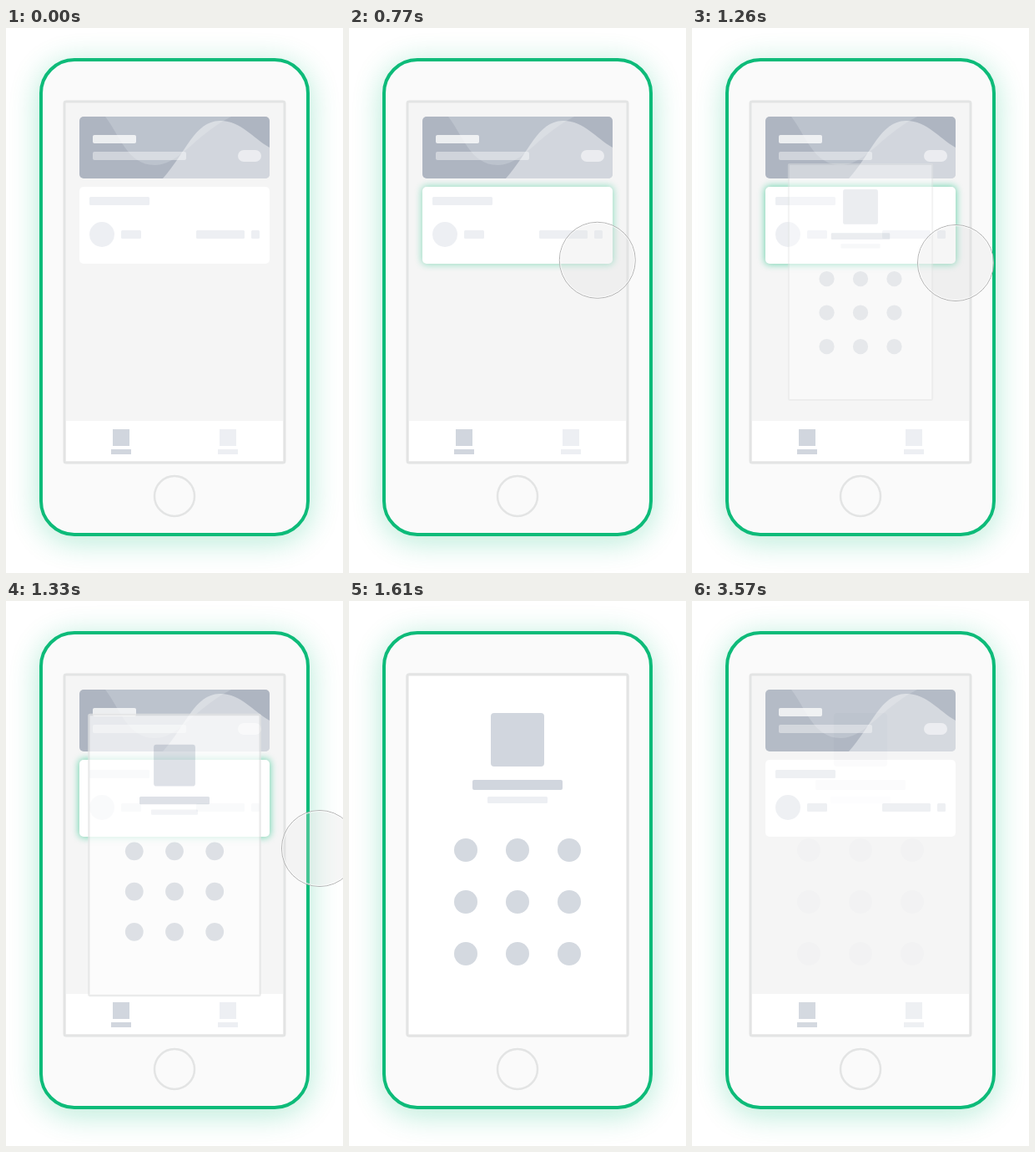
Recreate the animation shown at these times as an HTML page. Size 404 by 652 pixels, loop 4.06 s.

```html
<!DOCTYPE html>
<html lang="en">
<head>
<meta charset="utf-8">
<title>Phone lock screen</title>
<style>
html, body { margin: 0; width: 100%; height: 100%; overflow: hidden; background: #fff; }
svg { display: block; }
.line { stroke: #e3e4e4; stroke-width: 3; }
.mid { fill: #d1d6de; }
.pale { fill: #edeff3; }
.glow { fill: #0dbb79; }
</style>
</head>
<body>
<svg width="404" height="652" viewBox="0 0 404 652">
  <defs>
    <filter id="wide" x="-30%" y="-20%" width="160%" height="140%"><feGaussianBlur stdDeviation="18"/></filter>
    <filter id="soft" x="-20%" y="-40%" width="140%" height="180%"><feGaussianBlur stdDeviation="4"/></filter>
    <clipPath id="round"><rect x="88" y="106" width="228" height="74" rx="5"/></clipPath>
  </defs>

  <!-- Phone body -->
  <rect class="glow" x="40" y="42" width="324" height="572" rx="42" opacity=".3" filter="url(#wide)"/>
  <rect x="42" y="38" width="320" height="568" rx="40" fill="#fafafa" stroke="#0dbb79" stroke-width="4"/>
  <circle cx="202" cy="560" r="24" fill="none" stroke="#e3e4e4" stroke-width="2.5"/>
  <rect class="line" x="70" y="88" width="264" height="432" rx="2" fill="#f5f5f5"/>

  <!-- Banner -->
  <g clip-path="url(#round)">
    <rect x="88" y="106" width="228" height="74" fill="#aeb5c1"/>
    <path d="M119 106C136 128 146 164 178 164C208 164 226 128 270 106Z" fill="#bcc3cd"/>
    <path d="M188 180C216 149 226 111 257 111C282 111 296 132 316 143V180Z" fill="#fff" opacity=".44"/>
  </g>
  <g fill="#fff">
    <rect x="104" y="128" width="52" height="10" rx="2" opacity=".77"/>
    <rect x="104" y="148" width="112" height="10" rx="2" opacity=".42"/>
    <rect x="278" y="146" width="28" height="14" rx="7" opacity=".55"/>
  </g>

  <!-- Card -->
  <rect id="halo" class="glow" x="87" y="189" width="230" height="94" rx="6" filter="url(#soft)"/>
  <rect x="88" y="190" width="228" height="92" rx="5" fill="#fff"/>
  <g class="pale">
    <rect x="100" y="202" width="72" height="10" rx="1.5"/>
    <circle cx="115" cy="247" r="15"/>
    <rect x="138" y="242" width="24" height="10" rx="1.5"/>
    <rect x="228" y="242" width="58" height="10" rx="1.5"/>
    <rect x="294" y="242" width="10" height="10" rx="1.5"/>
  </g>

  <!-- Tab bar -->
  <rect x="72" y="470" width="260" height="48" fill="#fff"/>
  <path class="mid" d="M128 480h20v20h-20zM126 504h24v6h-24z"/>
  <path class="pale" d="M256 480h20v20h-20zM254 504h24v6h-24z"/>

  <g id="lock">
    <rect class="line" x="70" y="88" width="264" height="432" rx="2" fill="#fff"/>
    <rect class="mid" x="170" y="134" width="64" height="64" rx="4"/>
    <rect class="mid" x="148" y="214" width="108" height="12" rx="2"/>
    <rect class="pale" x="166" y="234" width="72" height="8" rx="1.5"/>
    <g id="dots" fill="#d4d9e0"></g>
  </g>

  <g id="touch">
    <circle r="45.5" fill="#dcdcdc" fill-opacity=".27" stroke="#b2b2b2"/>
    <circle r="44.5" fill="none" stroke="#fff" stroke-opacity=".7"/>
  </g>
</svg>
<script>
const LOOP = 4060, STEP = 70;
const get = id => document.getElementById(id);
const clamp = v => Math.min(1, Math.max(0, v));
const part = (t, from, to) => clamp((t - from) / (to - from));
const easeOut = (u, power) => 1 - (1 - u) ** power;
const [halo, lock, dots, touch] = ['halo', 'lock', 'dots', 'touch'].map(get);

for (let i = 0; i < 9; i++) {
  const x = 140 + 62 * (i % 3), y = 298 + 62 * Math.floor(i / 3);
  dots.innerHTML += `<circle cx="${x}" cy="${y}" r="14"/>`;
}

function lockOpacity(t) {
  if (t < 3360) return easeOut(part(t, 1190, 1610), 3.1);
  return t < 3430 ? 0.62 : t < 3570 ? 0.22 : 0.08;
}

function draw(t) {
  halo.setAttribute('opacity', t < 1610 ? 0.55 * part(t, 560, 840) : 0);

  const size = 0.5 + 0.5 * easeOut(part(t, 1190, 1610), 2);
  lock.setAttribute('opacity', lockOpacity(t));
  lock.setAttribute('transform', `translate(202 304) scale(${size}) translate(-202 -304)`);

  // Slide in diagonally, press, then leave to the right
  const away = 150 * (1 - easeOut(part(t, 350, 840), 2.28));
  const leave = Math.max(0, (t - 1190) / 140) ** 2;
  const press = t >= 980 && t < 1120 ? 0.9 : 1;
  const shown = t >= 420 && t < 1470;
  touch.setAttribute('visibility', shown ? 'visible' : 'hidden');
  touch.setAttribute('transform',
    `translate(${296 + away + 80 * leave} ${276 + away + 20 * leave}) scale(${press})`);
}

const start = performance.now();
function tick() {
  const t = (performance.now() - start) % LOOP;
  draw(Math.floor(t / STEP) * STEP);
  requestAnimationFrame(tick);
}
tick();
</script>
</body>
</html>
```
